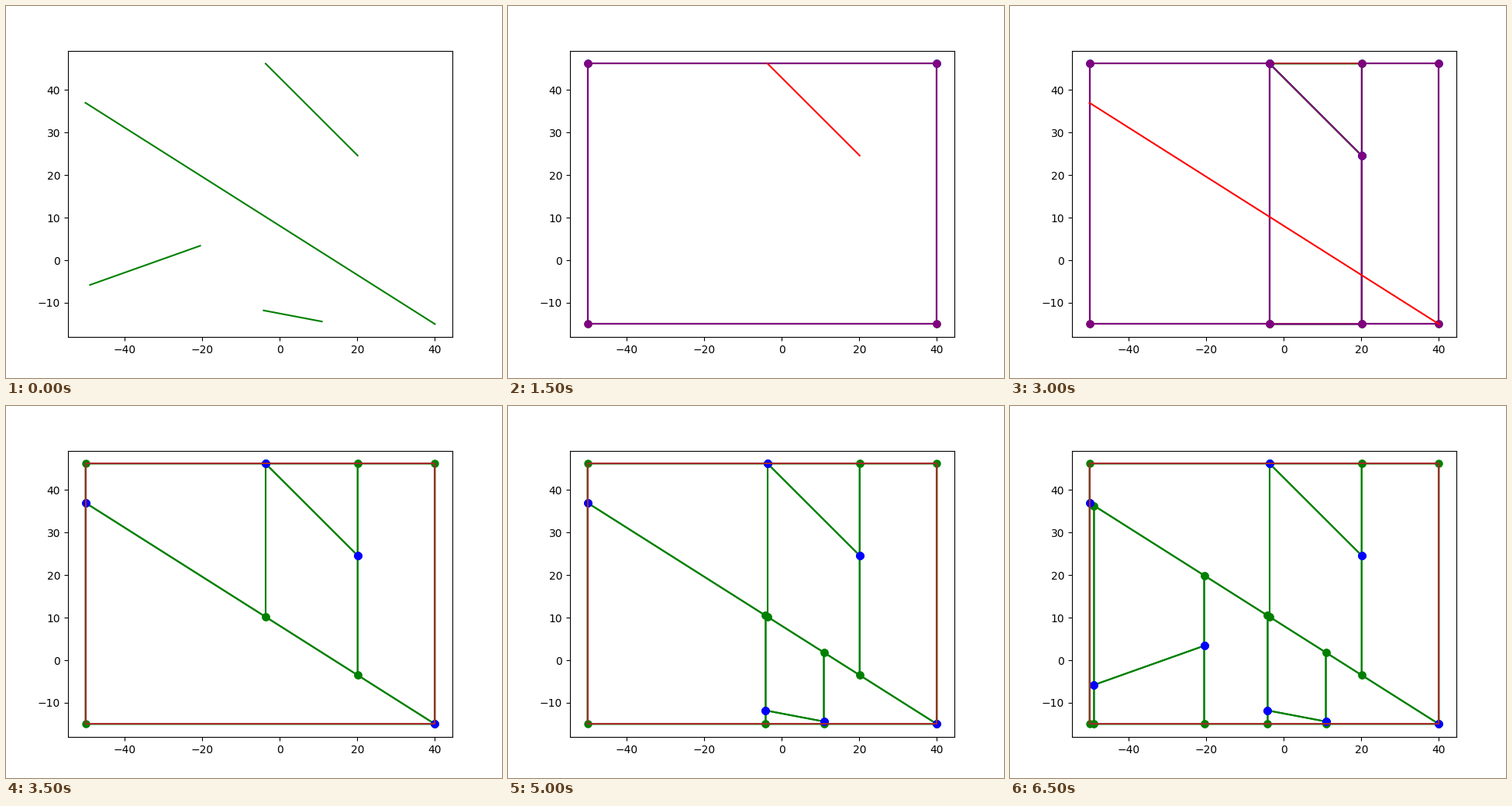
A matplotlib script for the animation above (7 s loop, 640 by 480 pixels).

```python
import matplotlib.pyplot as plt
from matplotlib.animation import ArtistAnimation

LEFT, RIGHT, LOW, HIGH = -50, 40, -15, 46.2

# Segments in the order they are inserted
S1 = ((-3.602, HIGH), (20.1, 24.6))
S2 = ((LEFT, 37), (RIGHT, LOW))
S3 = ((-4.112, -11.8), (10.878, -14.4))
S4 = ((-48.831, -5.8), (-20.459, 3.4))
SEGMENTS = [S1, S2, S3, S4]

ROOF = ((LEFT, HIGH), (RIGHT, HIGH))
FLOOR = ((LEFT, LOW), (RIGHT, LOW))


def height(seg, x):
    (x0, y0), (x1, y1) = seg
    return y0 + (y1 - y0) * (x - x0) / (x1 - x0)


def corners(trap):
    top, bottom, start, end = trap
    a, b = start[0], end[0]
    return [(a, height(bottom, a)), (a, height(top, a)),
            (b, height(top, b)), (b, height(bottom, b))]


def split(trap, seg):
    """Cut one trapezoid by a segment lying fully inside it."""
    top, bottom, start, end = trap
    p, q = seg
    parts = [(top, bottom, start, p), (top, seg, p, q),
             (seg, bottom, p, q), (top, bottom, q, end)]
    return [t for t in parts if t[2][0] < t[3][0]]


# Each step: the current trapezoids and those the next segment crosses
whole = (ROOF, FLOOR, *ROOF)
map0 = [whole]
map1 = split(whole, S1)
west, above, below, east = map1
under = (S2, FLOOR, *S2)
map2 = [(ROOF, S2, S2[0], S1[0]), above, (S1, S2, *S1),
        (ROOF, S2, S1[1], S2[1]), under]
cut3 = split(under, S3)
map3 = map2[:-1] + cut3
map4 = map2[:-1] + split(cut3[0], S4) + cut3[1:]
STEPS = [(map0, [whole]), (map1, [west, below, east]),
         (map2, [under]), (map3, [cut3[0]])]

fig, ax = plt.subplots(figsize=(6.4, 4.8), dpi=100)
mx, my = 0.05 * (RIGHT - LEFT), 0.05 * (HIGH - LOW)
ax.set_xlim(LEFT - mx, RIGHT + mx)
ax.set_ylim(LOW - my, HIGH + my)


def path(points, color):
    return ax.plot(*zip(*points), color=color, lw=1.5)


def dots(points, color):
    return ax.plot(*zip(*points), "o", color=color, ms=6, mew=1.5)


def outline(traps, color):
    art = []
    for trap in traps:
        ring = corners(trap)
        art += path(ring + ring[:1], color)
    return art + dots([c for t in traps for c in corners(t)], color)


def draw_map(traps):
    art = outline(traps, "green")
    art += dots([p for t in traps for p in t[2:]], "blue")
    ring = corners(whole)
    return art + path(ring + ring[:1], "brown")


frames = [[line for seg in SEGMENTS for line in path(seg, "green")]]
for seg, (traps, hit) in zip(SEGMENTS, STEPS):
    frames.append(draw_map(traps))
    frames.append(draw_map(traps) + path(seg, "tab:blue"))
    frames.append(draw_map(traps) + outline(hit, "purple") + path(seg, "red"))
frames.append(draw_map(map4))

anim = ArtistAnimation(fig, frames, interval=500, repeat=True, repeat_delay=0)
plt.show()
```
